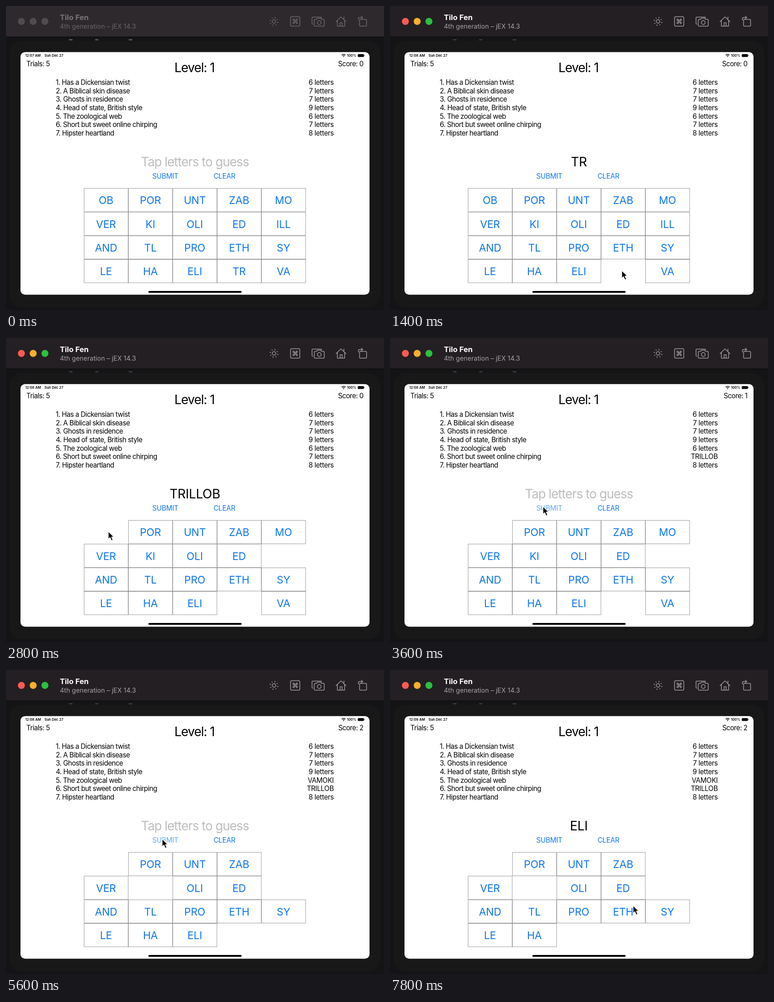
An HTML page that plays this animation: 835x671 px, repeating every 8000 ms.

```html
<!DOCTYPE html>
<html lang="en">
<head>
<meta charset="utf-8">
<title>Word puzzle on a tablet simulator</title>
<style>
  html, body { margin: 0; width: 100%; height: 100%; overflow: hidden; background: #141416; }
  svg { display: block; width: 100%; height: 100%; }
  text { font-family: Inter, Roboto, sans-serif; white-space: pre; }
  .title { font-size: 16.6px; font-weight: 700; fill: #fff; }
  .subtitle { font-size: 14.4px; fill: #a5a2a4; }
  .icons { fill: none; stroke: #a09c9f; stroke-width: 1.5; stroke-linejoin: round; stroke-linecap: round; }
  .bar { fill: #241f23; }
  .peek { fill: #36383b; }
  .inactive .bar { fill: #2e292d; }
  .inactive .light { fill: #504b4f; }
  .inactive .title { fill: #777376; }
  .inactive .subtitle { fill: #676366; }
  .inactive .icons { stroke: #6d696c; }
  .inactive .peek { fill: #50565a; }
  .status { font-size: 7.6px; font-weight: 600; }
  .body { font-size: 15.2px; letter-spacing: -.034em; }
  .large { font-size: 27.9px; letter-spacing: -.038em; }
  .word { letter-spacing: -.01em; }
  .hint { fill: #bdbdbf; }
  .mid { text-anchor: middle; }
  .end { text-anchor: end; }
  .count { letter-spacing: -.022em; }
  .button { font-size: 15.2px; letter-spacing: -.012em; fill: #0b77ef; }
  .tile text { font-size: 22.9px; letter-spacing: -.005em; fill: #0b77ef; }
  .tile rect { fill: none; stroke: #777; stroke-width: .75; }
</style>
</head>
<body>
<svg id="stage" viewBox="0 0 835 671" preserveAspectRatio="none">
  <rect width="835" height="671" fill="#141416"/>
  <rect class="bar" width="835" height="68"/>
  <rect y="67.5" width="835" height="1.5" fill="#0c0b0d"/>
  <g class="peek">
    <rect x="139" y="73" width="8" height="3"/>
    <rect x="197" y="73" width="7" height="3"/>
    <rect x="271" y="73" width="8" height="3"/>
  </g>
  <rect x="8" y="77" width="819" height="588" rx="26" fill="#181818"/>

  <circle class="light" cx="34" cy="34" r="7.7" fill="#fc5a53"/>
  <circle class="light" cx="60" cy="34" r="7.7" fill="#fdb02c"/>
  <circle class="light" cx="86" cy="34" r="7.7" fill="#2ac140"/>
  <text class="title" x="119" y="31.3">Tilo Fen</text>
  <text class="subtitle" x="119" y="49.6">4th generation – jEX 14.3</text>

  <g class="icons">
    <g transform="translate(592 34) rotate(15)">
      <circle r="3.8"/>
      <path d="M0-9.5v2M0 7.500v2M-9.500 0h2M7.500 0h2M-6.400-6.400l1 1M5.400 5.400l1 1M-6.400 6.400l1-1M5.400-5.400l1-1"/>
    </g>
    <rect x="628.5" y="23.5" width="20.5" height="21" rx="3"/>
    <path transform="translate(632 27.1) scale(.57)" stroke-width="2.5" d="M18 3a3 3 0 0 0-3 3v12a3 3 0 1 0 3-3H6a3 3 0 1 0 3 3V6a3 3 0 1 0-3 3h12a3 3 0 0 0 0-6z"/>
    <path d="M678 40h-.5a1.5 1.5 0 0 1-1.5-1.5v-12a2 2 0 0 1 2-2h17a2 2 0 0 1 2 2"/>
    <path d="M683 29.5h3l2-2.5h7l2 2.5h4a2 2 0 0 1 2 2v11a2 2 0 0 1-2 2h-18a2 2 0 0 1-2-2v-11a2 2 0 0 1 2-2z"/>
    <circle cx="692" cy="36.5" r="4.2"/>
    <path d="M729 34.5l11-10.5 11 10.5M732 32v12.5h16v-12.5M746.5 29v-5M738 44v-7h4.5v7"/>
    <path d="M783 29.5h11.5a2 2 0 0 1 2 2v11a2 2 0 0 1-2 2h-11.5a2 2 0 0 1-2-2v-11a2 2 0 0 1 2-2zM778.5 31v-3.5a2 2 0 0 1 2-2h7M785 22.5l3 3-3 3"/>
  </g>

  <rect x="32" y="101.8" width="771" height="535.5" rx="10" fill="#fff"/>
  <text class="status" id="clock" x="42.5" y="112.2"></text>
  <text class="status" x="85" y="112.2">Sun Dec 27</text>
  <g fill="none" stroke="#000" stroke-width="1.3">
    <path d="M741.5 108.2q4.3-3.7 8.6 0M743.3 110q2.5-2.2 5 0"/>
  </g>
  <circle cx="745.8" cy="111.7" r="1"/>
  <text class="status" x="753" y="112.2">100%</text>
  <rect x="777" y="106.3" width="13.5" height="6.2" rx="1.5"/>
  <rect x="791" y="108.2" width="1.1" height="2.4" rx=".5"/>

  <text class="body" x="45" y="132.6">Trials: 5</text>
  <text class="large mid" x="416.3" y="145.8">Level: 1</text>
  <text class="body end" id="score" x="789.5" y="132.6"></text>
  <g id="clues"></g>
  <text id="guess" x="417.2" y="353.5"></text>
  <text class="button mid" id="submit" x="352" y="380.8">SUBMIT</text>
  <text class="button mid" x="482.5" y="380.8">CLEAR</text>
  <g id="tiles"></g>
  <rect x="314.5" y="629" width="206" height="4" rx="2"/>
  <path id="cursor" d="M0 0V17l3.9-3.7 3 7 3.2-1.3-3-6.8h5.4z" stroke="#fff" stroke-width="1.2" stroke-linejoin="round"/>
</svg>
<script>
  const LOOP = 8000, STEP = 200, ACTIVE_AT = 1000;
  const HINT = 'Tap letters to guess';
  const clues = [
    ['Has a Dickensian twist', 6], ['A Biblical skin disease', 7],
    ['Ghosts in residence', 7], ['Head of state, British style', 9],
    ['The zoological web', 6], ['Short but sweet online chirping', 7],
    ['Hipster heartland', 8]
  ];
  const bits = ('OB POR UNT ZAB MO VER KI OLI ED ILL ' +
                'AND TL PRO ETH SY LE HA ELI TR VA').split(' ');
  const taps = [
    [1400, 'TR'], [1800, 'ILL'], [2600, 'OB'],
    [4000, 'VA'], [4400, 'MO'], [4800, 'KI'], [7400, 'ELI']
  ];
  const submits = [
    { at: 3400, clue: 5, answer: 'TRILLOB' },
    { at: 5600, clue: 4, answer: 'VAMOKI' }
  ];
  const path = [
    [1000, 480, 610], [1200, 510, 584], [1400, 512, 584], [1800, 625, 478],
    [2000, 629, 476], [2600, 224, 428], [2800, 226, 427], [3400, 338, 372],
    [3600, 338, 372], [4000, 608, 584], [4400, 606, 430], [4600, 359, 480],
    [4800, 322, 482], [5400, 345, 373], [5800, 345, 373], [6600, 684, 173],
    [6800, 680, 180], [7400, 418, 582], [7600, 424, 580], [7800, 537, 520]
  ];

  const $ = id => document.getElementById(id);
  function add(parent, name, attrs = {}, content = '') {
    const node = document.createElementNS(parent.namespaceURI, name);
    for (const key in attrs) node.setAttribute(key, attrs[key]);
    node.textContent = content;
    return parent.appendChild(node);
  }

  const answers = clues.map(([clue], i) => {
    const y = 173.8 + i * 18.7;
    add($('clues'), 'text', { class: 'body', x: 110, y }, `${i + 1}. ${clue}`);
    return add($('clues'), 'text', { class: 'body end count', x: 724, y });
  });

  const tiles = bits.map((bit, i) => {
    const x = 172.3 + i % 5 * 98, y = 402.3 + Math.floor(i / 5) * 52.24;
    const tile = add($('tiles'), 'g', { class: 'tile' });
    add(tile, 'rect', { x: x + .35, y: y + .35, width: 97.3, height: 51.55 });
    add(tile, 'text', { class: 'mid', x: x + 48.7, y: y + 35 }, bit);
    return tile;
  });

  function cursorAt(t) {
    const next = path.findIndex(p => p[0] > t);
    if (next < 0) return path[path.length - 1].slice(1);
    if (next === 0) return path[0].slice(1);
    const [t0, x0, y0] = path[next - 1], [t1, x1, y1] = path[next];
    const u = (t - t0) / (t1 - t0), k = u * u * (3 - 2 * u);
    return [x0 + (x1 - x0) * k, y0 + (y1 - y0) * k];
  }

  function render(t) {
    const active = t >= ACTIVE_AT;
    const tapped = taps.filter(([at]) => at <= t);
    const solved = submits.filter(s => s.at <= t);
    const since = solved.length ? solved[solved.length - 1].at : 0;
    const guess = tapped.filter(([at]) => at > since).map(([, bit]) => bit).join('');
    const hidden = tapped.map(([, bit]) => bit);

    $('stage').classList.toggle('inactive', !active);
    $('clock').textContent = `12:0${t >= 7200 ? 9 : active ? 8 : 7} AM`;
    $('score').textContent = `Score: ${solved.length}`;
    $('guess').textContent = guess || HINT;
    $('guess').setAttribute('class', 'large mid ' + (guess ? 'word' : 'hint'));
    $('submit').style.opacity = solved.length && t - since <= STEP ? .65 : 1;
    answers.forEach((node, i) => {
      const hit = solved.find(s => s.clue === i);
      node.textContent = hit ? hit.answer : `${clues[i][1]} letters`;
    });
    tiles.forEach((tile, i) => {
      tile.style.display = hidden.includes(bits[i]) ? 'none' : '';
    });
    $('cursor').style.display = active ? '' : 'none';
    $('cursor').setAttribute('transform', `translate(${cursorAt(t)})`);
  }

  const start = performance.now();
  function tick() {
    const t = (performance.now() - start) % LOOP;
    render(Math.floor(t / STEP) * STEP);
    requestAnimationFrame(tick);
  }
  tick();
</script>
</body>
</html>
```
